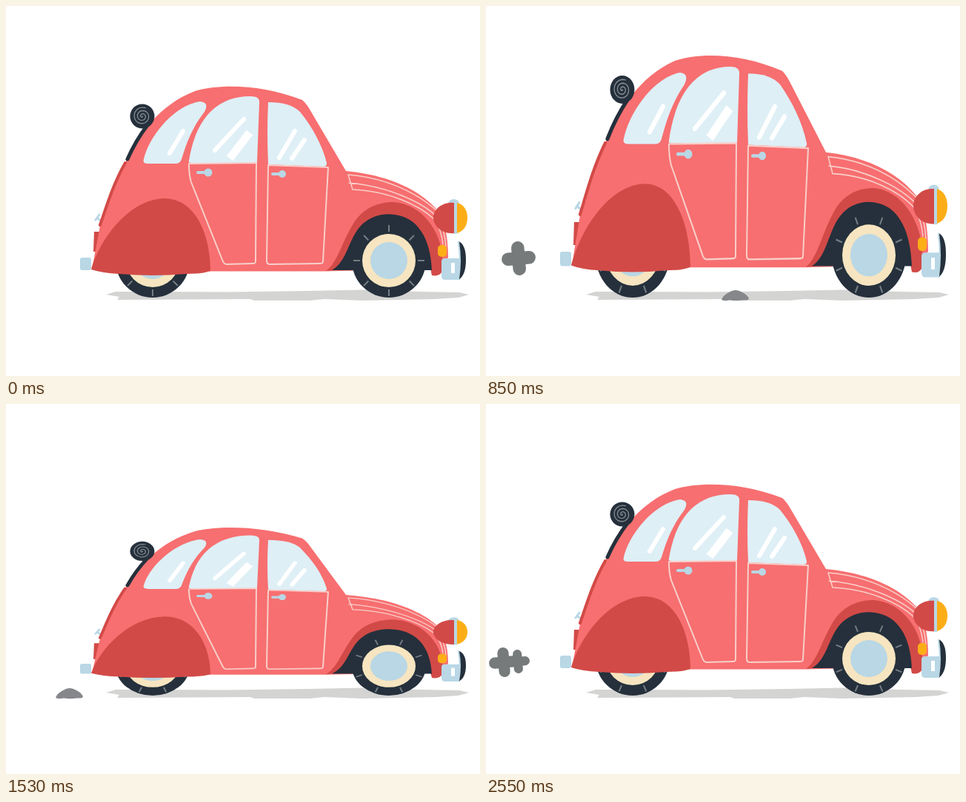
Write an HTML page that moves like this. It is 640 by 500 pixels and loops after 2720 ms.

```html
<!DOCTYPE html>
<html lang="en">
<head>
<meta charset="utf-8">
<title>Bumpy car</title>
<style>
  html, body { margin: 0; width: 100%; height: 100%; overflow: hidden; background: #fff; }
  svg { display: block; width: 640px; height: 500px; }
  .line { fill: none; stroke-linecap: round; stroke-linejoin: round; }
  .body { fill: #f76f70; }
  .dark { fill: #d24a47; }
  .navy { fill: #25303c; }
  .blue { fill: #b9d7e5; }
  .glass { fill: #deeff6; }
  .amber { fill: #fcae17; }
  .trim { stroke: #f9cfca; }
  .glint { stroke: #fff; stroke-width: 6; }
</style>
</head>
<body>
<svg viewBox="0 0 640 500">
  <defs>
    <g id="wheel">
      <circle r="50" class="navy"/>
      <g class="ticks"></g>
      <circle r="36" fill="#f6e5c0"/>
      <circle r="25" class="blue"/>
    </g>
  </defs>

  <path fill="#d4d4d3" d="M135 390L148 386 300 386.5 410 385 480 383.500 560 386 612 387 625 390 611 394 580 396 480 398 430 396 410 398 335 398 330 396 150 397 153 393Z"/>
  <path id="stone" fill="#85878a" d="M-19 14Q-17 8-9 4Q-2-1 5 2Q15 6 18 12Q18 15 10 14.500Q0 16-8 14.500Q-16 16-19 14Z"/>
  <g id="smoke" class="line" stroke="#767a7b"></g>

  <g id="car">
    <use href="#wheel" x="198" y="344"/>
    <rect class="blue" x="100" y="340" width="15" height="17" rx="3"/>
    <path class="dark" d="M119 305H128V332H118Z"/>
    <path class="line" stroke="#b9d7e5" stroke-width="3" d="M121 289L126 282M124 287L128 290"/>

    <path class="body" d="M116 356L127 297C133 272 145 235 162 210C178 174 208 133 255 115C290 105 345 106 400 127Q406 132 412 143L459 223C515 228 562 249 586 280C594 297 597 318 597 340L580 355 430 358.500H276L200 358Z"/>
    <path class="line" stroke="#d24a47" stroke-width="4" d="M161 212C145 240 136 270 127 296"/>
    <path class="line" stroke="#25303c" stroke-width="5" d="M164 207Q175 182 191 161"/>
    <circle class="navy" cx="184" cy="149" r="16.500"/>
    <path id="spiral" class="line" stroke="#8c9499" stroke-width="1.200"/>

    <path class="dark" d="M115 356C128 313 166 262 213 260C256 259 276 310 276 358Q266 362 243 362Q198 366 153 362Q130 361 115 356Z"/>

    <g class="glass">
      <path d="M186 207C193 176 227 134 262 129Q275 130 268 143C250 166 243 188 237 207Q235 213 229 213H192Q184 213 186 207Z"/>
      <path d="M247 209C253 171 272 122 330 122Q343 122 342 131L339 212H250Q246 212 247 209Z"/>
      <path d="M354 130Q384 130 397 143C414 164 427 188 433 212Q434 217 428 217L354 214Q352 172 354 130Z"/>
    </g>
    <g class="line trim" stroke-width="2">
      <path d="M248 213L338 212 337 345Q337 348 333 348L298 349Q294 349 292 343L250 238Q247 228 247 213"/>
      <path d="M354 215L435 218 428 345Q428 348 424 348L356 349Q352 349 352 344Z"/>
    </g>
    <path class="line" stroke="#b9d7e5" stroke-width="4" d="M259 225H275M360 227H375"/>
    <circle class="blue" cx="273" cy="225" r="5.500"/>
    <circle class="blue" cx="373" cy="227" r="5"/>

    <g id="glintA" class="line glint">
      <path d="M221 199L239 169M282 195L321 153M369 205L390 169M386 206L403 181"/>
      <path stroke-width="11" stroke-linecap="butt" d="M302 206L329 171"/>
    </g>
    <g id="glintB" class="line glint">
      <path d="M200 193L212 178M220 199L238 172M292 199L319 153M360 179L379 155M362 202L384 169M378 208L397 175"/>
      <path stroke-width="8" d="M264 186L283 160"/>
    </g>

    <path class="line trim" stroke-width="1.500" d="M462 228C512 232 556 252 584 279M463 239C512 243 562 264 583 286Q592 300 594 325M462 228L468 248C515 250 557 268 578 288Q588 302 590 322"/>

    <path class="dark" d="M432 358C449 346 454 315 473 288C487 270 506 265 524 265C562 268 588 305 589 340V358Q586 366 575 364L571 345Z"/>
    <path class="navy" d="M440 357C461 345 462 315 479 297C493 282 512 280 525 282C555 286 573 312 575 357Z"/>
    <use href="#wheel" x="517" y="344"/>

    <path class="blue" d="M597 268Q597 262 604 261Q612 261 612 268ZM588 345Q588 341 593 341H613V370H593Q588 370 588 365Z"/>
    <rect fill="#fff" x="601" y="347" width="5" height="14"/>
    <path class="navy" d="M611 318Q621 322 621 343Q621 364 611 370Q615 344 611 318Z"/>
    <path class="line" stroke="#b9d7e5" stroke-width="2" d="M611 319Q615 344 611 369"/>
    <path class="dark" d="M606 266C589 264 577 275 577 286C577 298 590 309 606 307Z"/>
    <path class="amber" d="M609 266C618 268 623 276 623 286C623 297 618 304 609 307Z"/>
    <path class="blue" d="M605 265H609V308H605Z"/>
    <rect class="amber" x="583" y="323" width="12" height="16" rx="5"/>
  </g>
</svg>
<script>
const STEP = 170, STEPS = 16;
const $ = id => document.getElementById(id);

const squash = s => `translate(0 394) scale(1 ${s}) translate(0 -394)`;
const noseUp = "rotate(-1.9 210 248)", tailUp = "rotate(2 535 372)";
const low = squash(.796), tall = squash(1.147);
const poses = { 3: noseUp, 4: low, 5: tall, 7: tailUp, 8: tailUp, 9: low, 10: tall };

// Stone centre for steps 1 to 9
const stoneX = [597, 550, 502, 436, 337, 238, 195, 152, 86];

// Smoke puffs per step: x, y, radius
const fresh = [83, 348, 11], drift = [42, 346, 18];
const puffs = {
  1: [fresh], 2: [fresh], 3: [[72, 348, 15]], 4: [[58, 344, 19]], 5: [[44, 341, 23]],
  7: [[82, 348, 11]], 8: [[70, 348, 15]],
  10: [[83, 348, 13]], 11: [[63, 348, 16]], 12: [drift],
  13: [drift, fresh], 14: [drift, [70, 348, 14]], 15: [[24, 349, 20], [43, 348, 16]]
};

function puff([x, y, r]) {
  const w = r * .76, a = r - w / 2;
  return `<path transform="translate(${x} ${y}) rotate(-5)"
    stroke-width="${w}" d="M${-a} 0H${a}M0 ${-a}V${a}"/>`;
}

const ticks = document.querySelector(".ticks");
ticks.innerHTML = Array.from({ length: 8 }, (_, i) =>
  `<path d="M0-48V-39" stroke="#747d83" stroke-width="2" transform="rotate(${i * 45})"/>`).join("");

$("spiral").setAttribute("d", "M" + Array.from({ length: 50 }, (_, i) => {
  const a = i * .36, r = i * .25;
  return `${184 + r * Math.cos(a)} ${149 + r * Math.sin(a)}`;
}).join("L"));

let shown = -1;
function draw(now) {
  const k = Math.floor(now / STEP) % STEPS;
  if (k === shown) return;
  shown = k;
  $("car").setAttribute("transform", poses[k] || "");
  ticks.setAttribute("transform", `rotate(${k % 2 * 22.5})`);
  $("stone").setAttribute("transform", `translate(${stoneX[k - 1] || -99} 383)`);
  $("smoke").innerHTML = (puffs[k] || []).map(puff).join("");
  const shifted = k === 3 || k === 7;
  $("glintA").style.display = shifted ? "none" : "";
  $("glintB").style.display = shifted ? "" : "none";
}

const start = performance.now();
function loop() {
  draw(performance.now() - start);
  requestAnimationFrame(loop);
}
loop();
</script>
</body>
</html>
```
